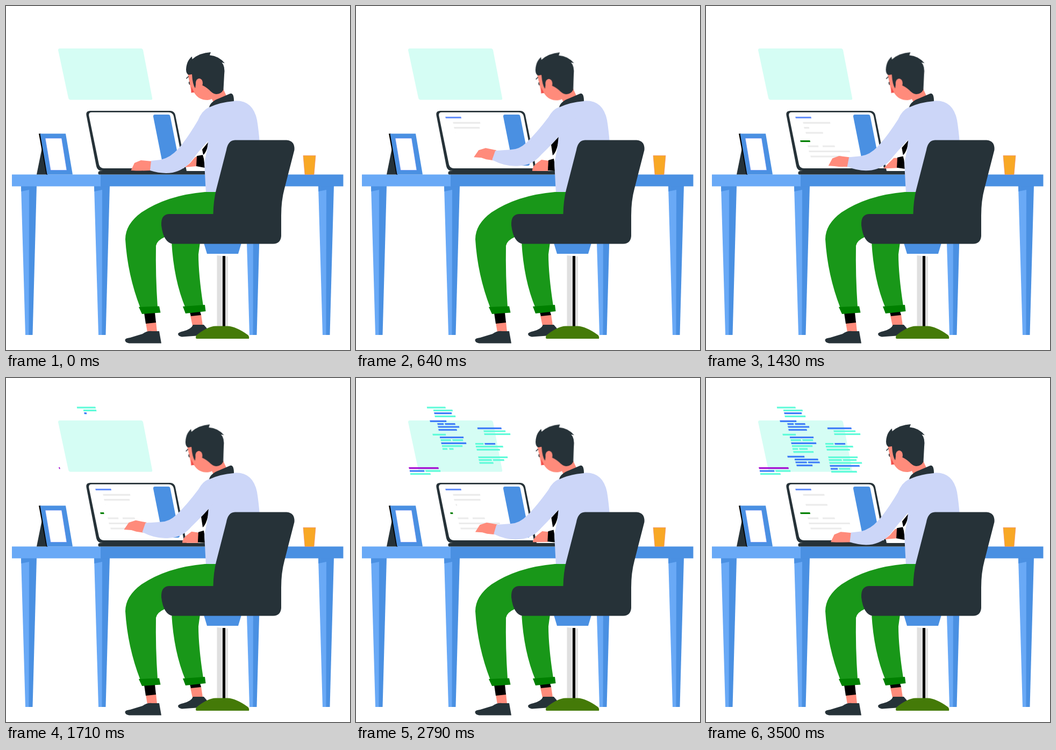
An HTML page without scripts for the animation above (3570 ms loop, 640 px wide and 640 px high).

```html
<!DOCTYPE html>
<html lang="en">
<head>
<meta charset="utf-8">
<title>Working at a desk</title>
<style>
@property --now { syntax: "<number>"; inherits: true; initial-value: 0; }

html, body { margin: 0; width: 100%; height: 100%; overflow: hidden; background: #fff; }
svg {
  display: block; width: 100%; height: 100%;
  --dark: #263238; --blue: #4a90e2; --sky: #69a9f6; --skin: #ff8b7b; --shirt: #ccd6f8;
  animation: clock 3570ms linear infinite;
}
@keyframes clock { from { --now: 0; } to { --now: 3570; } }

.dark { fill: var(--dark); }
.blue { fill: var(--blue); }
.sky { fill: var(--sky); }
.skin { fill: var(--skin); }
.shirt { fill: var(--shirt); }
.pants { fill: #199719; }
.cuff { fill: #008000; }

/* Typed rows: --t start, --g time to type, --e time to erase (ms) */
rect.row, .rows rect {
  height: 3.5px;
  transform-box: fill-box; transform-origin: 0 0; transform: skewX(11.3deg);
  --g: 160;
  --d: max(0, var(--now) - var(--t));
  --w: min(1, var(--d) / var(--g));
  clip-path: inset(0 calc(100% * (1 - var(--w))) 0 0);
}
.rows .again {
  --p: (var(--d) - 1070 * (clamp(0, (var(--d) - 1070) * 9, 1) + clamp(0, (var(--d) - 2140) * 9, 1) + clamp(0, (var(--d) - 3210) * 9, 1)));
  --w: max(0, min(1, var(--p) / var(--g), (1070 - var(--p)) / var(--e)));
}
.code { fill: #ebebeb; }
.holo { fill: #5ffbd9; }
.holo .b { fill: #3f7df8; }
.holo .p { fill: #a50fd2; }

/* Typing pose */
.move { animation: 595ms cubic-bezier(.37, 0, .63, 1) infinite alternate; }
.head { animation-name: nod; transform-origin: 400px 170px; }
.arm { animation-name: arm; }
.hand { animation-name: hand; }
.far-hand { animation-name: far-hand; }
.far-cuff { animation-name: far-cuff; }
.far-arm { animation-name: far-arm; }
@keyframes nod { to { transform: rotate(-1.3deg); } }
@keyframes arm { to { d: path("M378 188Q366 192 358 207Q336 236 318 253Q304 267 288 267L259 269L253 286Q280 300 305 297Q328 296 345 276Q360 262 378 242L410 210Z"); } }
@keyframes hand { to { d: path("M219 281L228 268L241 264L261 268L255 287L242 285L233 282Z"); } }
@keyframes far-hand { to { d: path("M328 304Q330 296 338 291L345 286L359 288L358 307L328 307Z"); } }
@keyframes far-cuff { to { d: path("M358 287L368 284L369 290L370 307L357 306Z"); } }
@keyframes far-arm { to { d: path("M379 241L363 258L366 278Q374 272 379 241Z"); } }
</style>
</head>
<body>
<svg viewBox="0 0 640 640">
  <defs>
    <g id="leg">
      <path class="sky" d="M0 335H15V612H8Z"/>
      <path class="blue" d="M15 335H29L21.500 612H14.500Z"/>
      <path class="blue" d="M0 335H15V342L.3 345Z"/>
    </g>
  </defs>

  <!-- floating panel -->
  <path fill="#d5fdf4" d="M100 79H251Q254 79 255 82L272 171Q273 174.500 270 174.500H120Q117 174.500 116 171L97 82Q97 79 100 79Z"/>
  <g class="rows holo">
    <rect x="131.500" y="53.300" width="35" style="--t:1535"/>
    <rect x="143.500" y="58.600" width="36" style="--t:1603"/>
    <rect class="b" x="145" y="64" width="33" style="--t:1688"/>
    <rect x="146" y="69.500" width="39" style="--t:1771"/>
    <rect class="b" x="137" y="78.500" width="31" style="--t:1854"/>
    <rect class="b" x="151" y="84" width="12" style="--t:1937"/>
    <rect class="b" x="165" y="84" width="19.500" style="--t:1965"/>
    <rect class="b" x="152" y="89.300" width="40" style="--t:2020"/>
    <rect class="b" x="153" y="94.700" width="34.500" style="--t:2103"/>
    <rect x="142" y="103.500" width="25" style="--t:2186"/>
    <rect class="b" x="155.500" y="108.800" width="44.500" style="--t:2271"/>
    <rect x="157" y="114" width="19.500" style="--t:2376"/>
    <rect x="179" y="114" width="20" style="--t:2410"/>
    <rect class="b" x="158" y="119.500" width="47" style="--t:2481"/>
    <rect x="159.500" y="125" width="38.500" style="--t:2586"/>
    <rect x="160.500" y="130.300" width="10.500" style="--t:2650"/>
    <rect x="173" y="130.300" width="16" style="--t:2710"/>
    <rect x="162" y="136" width="38" style="--t:2796"/>
    <rect class="b" x="151" y="144.500" width="32" style="--t:2901"/>
    <rect class="b" x="164.500" y="150" width="44" style="--t:3006"/>
    <rect class="b" x="166" y="155.200" width="21.500" style="--t:3090"/>
    <rect class="b" x="189.500" y="155.200" width="22" style="--t:3140"/>
    <rect class="b" x="168" y="161" width="30" style="--t:3230"/>

    <rect class="b" x="225.500" y="92" width="45" style="--t:1770"/>
    <rect x="237" y="97.300" width="41" style="--t:1853"/>
    <rect x="238" y="102.700" width="49" style="--t:1936"/>
    <rect x="221.500" y="120.700" width="15.500" style="--t:2019"/>
    <rect class="b" x="239" y="120.700" width="20" style="--t:2102"/>
    <rect x="222.500" y="126" width="51" style="--t:2186"/>
    <rect x="224" y="131.500" width="43.500" style="--t:2293"/>
    <rect x="227" y="145.800" width="55" style="--t:2400"/>
    <rect x="228" y="151" width="24.500" style="--t:2507"/>
    <rect x="254.500" y="151" width="25.500" style="--t:2660"/>
    <rect x="229" y="156.300" width="61" style="--t:2722"/>
    <rect class="b" x="230" y="161.800" width="55.500" style="--t:2830"/>
    <rect class="b" x="231.500" y="167.200" width="13.500" style="--t:2940"/>
    <rect x="247" y="167.200" width="21" style="--t:3040"/>
    <rect x="232.500" y="172.500" width="48" style="--t:3140"/>

    <rect class="p" x="98" y="166" width="55.500" style="--t:1705"/>
    <rect class="b" x="99.500" y="171.300" width="27.500" style="--t:1880"/>
    <rect x="129" y="171.300" width="28" style="--t:2030"/>
    <rect x="100.500" y="176.800" width="38" style="--t:2150"/>
  </g>

  <!-- desk -->
  <use href="#leg" x="28"/>
  <use href="#leg" x="164"/>
  <use href="#leg" x="445"/>
  <use href="#leg" x="581"/>
  <path class="sky" d="M11 313.500H177V335.500H11Z"/>
  <path class="blue" d="M176 313.500H627.500V335.500H176Z"/>

  <!-- picture frame and cup -->
  <path class="dark" d="M67 264L57 313.500H78Z"/>
  <path d="M61 237.500H65L78 313.500H75Z"/>
  <path class="blue" d="M63.500 237.500H111L124 313.500H76.500Z"/>
  <path fill="#fff" stroke="#5b7ff5" stroke-width=".6" d="M73 246H103.500L113 305.500H83Z"/>
  <path fill="#f8a825" stroke="#f0896b" stroke-width=".7" d="M553 278.300H576L573 313.500H556Z"/>

  <!-- laptop -->
  <path class="dark" d="M157 195H305Q313 195 315 203L336 307H180Q170 307 168 298L149.500 203Q148.500 195 157 195Z"/>
  <path fill="#fff" d="M159 197.800H303Q310 198 312 205L331 302H182Q175 302 173 295L154.500 205Q153 198 159 197.800Z"/>
  <path class="dark" d="M175 307H380V313.500H173Q171 313 171.500 310Q172 307 175 307Z"/>
  <path class="blue" d="M277 202H302Q305 202 305.500 205L323 294Q323 297 320 297H295Q292 297 291.500 294L274 206Q273.500 202 277 202Z"/>
  <g class="rows code">
    <rect class="again" fill="#6690fb" x="166" y="205.800" width="29.500" style="--t:3;--g:165;--e:150"/>
    <rect class="again" x="180" y="215.500" width="51" style="--t:150;--g:180;--e:225"/>
    <rect class="again" x="182" y="225" width="58.500" style="--t:290;--g:430;--e:180"/>
    <rect class="again" x="185" y="234.300" width="46.500" style="--t:640;--g:200;--e:400"/>
    <rect class="again cuff" x="175" y="249.800" width="18.500" style="--t:675;--g:200;--e:90"/>
    <rect x="189" y="259.300" width="20" style="--t:920;--g:200"/>
    <rect x="216.500" y="259.300" width="23" style="--t:1050;--g:200"/>
    <rect x="191" y="268.800" width="76.500" style="--t:900;--g:250"/>
    <rect x="194" y="278.300" width="58" style="--t:1120;--g:250"/>
  </g>

  <!-- torso and arms -->
  <path class="move far-arm" d="M378 251L365 267L367 277Q373 273 378 251Z"/>
  <path class="skin move far-hand" d="M333 299Q342 294 346 288L352 281L356 280L355 298L333 300Z"/>
  <path class="move far-cuff" d="M355 279L366 277L368 284L370 301L354 298Z"/>
  <path class="shirt" d="M378 188Q400 178 424 176.500Q459 174 467 212Q470 230 472 255V350H372L369 291Q375 268 377 240Z"/>
  <path class="skin move hand" d="M232.500 306L239 292L251 287L272 289L269 306L250 306.500L242 306.500Z"/>
  <path class="shirt move arm" d="M378 188Q364 195 357 213Q335 250 320 266Q306 282 288 286L270 288L268 306Q290 313 310 310Q332 305 345 288Q360 268 377 250L410 210Z"/>

  <!-- neck and head -->
  <path class="skin" d="M378 163L404 154L410 167L386 179Z"/>
  <path class="dark" d="M378 188.500Q380 178 396 172L417 163Q424 161 424 177Q398 179 378 188.500Z"/>
  <g class="move head">
    <path class="skin" d="M338 126Q342 145 345 161L350 161Q358 175 375 175Q388 174 392 160L370 140L345 124Z"/>
    <path fill="#f0504c" d="M345 150L344.500 161.500L350 160.500Z"/>
    <path fill="none" stroke="#263238" stroke-width="1.600" d="M335.500 135L339.500 131M341 141q-1 3 1 5"/>
    <path class="dark" d="M335 118C336 104 341 98 346 94L346.500 99Q360 87 381 86L379 91.500Q396 93 407 106.500L401.500 105Q408 112 406 128L404.500 156Q400 164 391 164Q384 163 378 156Q371 150 366 148L354 140L352 153Q347 146 346 127L340 128Q335 126 335 118Z"/>
    <ellipse class="skin" cx="359.500" cy="143.500" rx="6.500" ry="8.700"/>
  </g>

  <!-- legs -->
  <path class="skin" d="M343 576L363 574L366 594L347 595Z"/>
  <path d="M342 570L361 568L363 575L344 577Z"/>
  <path class="dark" d="M320 610Q321 607 330 605Q345 601 348 593H368L374 600L362 613L327 615.500Q320 614 320 610Z"/>
  <path class="pants" d="M308 438Q312 510 334 562L367 558Q358 500 358 462L361 440Z"/>
  <path class="cuff" d="M329 559L370 556L371.500 568L334 572Z"/>
  <path class="skin" d="M260 589L279 587L281 606L263 607Z"/>
  <path d="M257 571L277 570L279 589L260 591Z"/>
  <path class="dark" d="M221.500 621Q222 618 231 617L254 610Q262 604 272 605H285L289 627.500H229Q221 626 221.500 621Z"/>
  <path class="pants" d="M392 346H370Q300 352 252 384Q222 406 222 434Q226 500 250 562L282 560Q278 500 279 446Q281 436 295 430L392 430Z"/>
  <path class="cuff" d="M247 560L285 558.500L287.500 570.500L253 573Z"/>

  <!-- chair -->
  <path class="blue" d="M368 441H438L432 461H374Z"/>
  <path fill="#e0e0e0" d="M392.500 464L413 466V598H392.500Z"/>
  <path d="M403 465H408V598H403Z"/>
  <path fill="#447a08" d="M353 617Q352.500 614 355 612Q375 596 390 595.500H412Q428 596 450 612Q453 615 452 619H355Q353 619 353 617Z"/>
  <path class="dark" d="M426 249.500H522Q538 251 536.500 268L518 340Q512 362 512 390V428Q511 442 497 442.500H311Q293 441 289 408Q288 388 303 387H385.500Q386 362 391 342L410 268Q413 250 426 249.500Z"/>
</svg>
</body>
</html>
```
